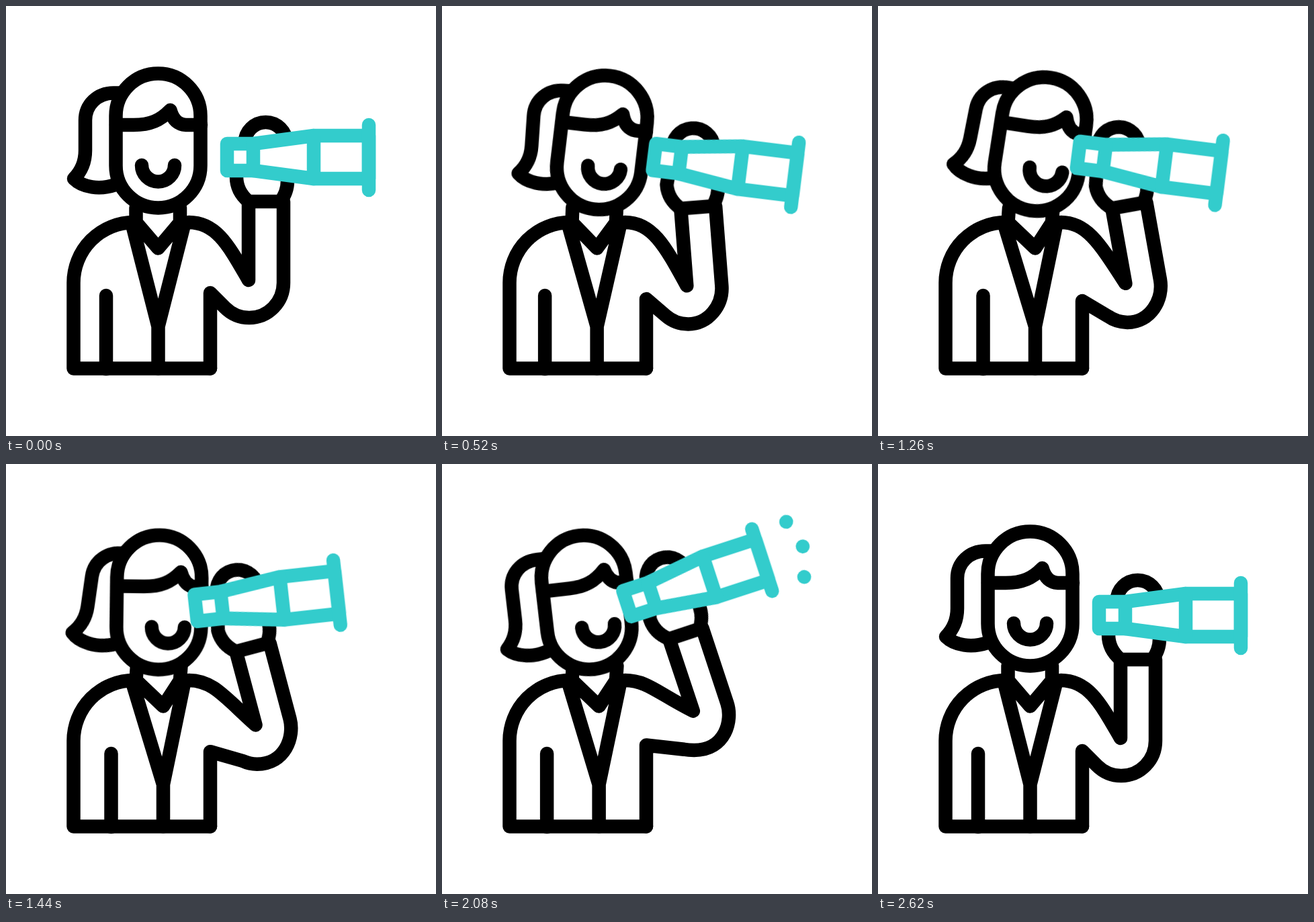
An HTML page without scripts for the animation above (3 s loop, 640 by 640 pixels).

```html
<!DOCTYPE html>
<html lang="en">
<head>
<meta charset="utf-8">
<title>Lookout</title>
<style>
  html, body { margin: 0; height: 100%; overflow: hidden; background: #fff; }
  svg { display: block; width: 100%; height: 100%; }
  path, rect { fill: none; stroke: #000; stroke-width: 20.5; stroke-linecap: round; stroke-linejoin: round; }
  .solid { fill: #fff; }
  .teal path { stroke: #3cc; }

  /* Three poses: --r at rest, --a looking down, --b looking up */
  .move, .morph, #pony, #rays { animation: 3s cubic-bezier(.333, 0, .667, 1) infinite; }
  .move { --r: translate(0px, 0px) rotate(0deg); animation-name: move; }
  .morph { animation-name: morph; }

  @keyframes move {
    0%, 6.667%, 86.667%, 100% { transform: var(--r); }
    26.667%, 36.667% { transform: var(--a); }
    56.667%, 66.667% { transform: var(--b); }
  }
  @keyframes morph {
    0%, 6.667%, 86.667%, 100% { d: var(--r); }
    26.667%, 36.667% { d: var(--a); }
    56.667%, 66.667% { d: var(--b); }
  }

  #head {
    transform-origin: 226.5px 200px;
    --a: translate(21.3px, 5px) rotate(12.2deg);
    --b: translate(-12px, 5.8px) rotate(-6.9deg);
  }
  #smile {
    --a: translate(14px, 0px) rotate(0deg);
    --b: var(--a);
  }
  #fringe {
    --r: path("M164 177L190 177C215 177 230 170 244.500 155C248 168 255 176 268 177L290 177");
    --a: path("M164 177L204 177C229 177 244 170 258.500 155C262 168 269 176 280 177L290 177");
    --b: var(--a);
  }
  #coat {
    --r: path("M193.500 300L193.500 322L226.500 360.500L259 322L259 300M187 322L226.500 477L266 322M226.500 477L226.500 539.500M149 431L149 540");
    --a: path("M195 300L193.500 322L234 360.500L259 322L260.500 300M187 322L234 477L266 322M234 477L234 539.500M156.500 431L156.500 540");
    --b: var(--a);
  }
  #arm {
    --r: path("M272 322C314 322 332 358 361 408L361 291M413 291L413 412C413 441 390 464 362 464C348 464 336 459 326 449L304 427L304 539.500");
    --a: path("M272 322C312 322 331 355 367 423L350.800 310.700M402.300 303.300L419 419.500C423 449 402 481 370 481C358 481 347 477 338 470L304 443.500L304 539.500");
    --b: path("M272 322C305 322 320 340 374.500 365.500L337 259.100M386.100 241.900L424.900 352.800C434 378 424 424 376 424C371 424 367 424 362 423.500L304 418L304 539.500");
  }
  #hand {
    transform-origin: 361px 408px;
    --a: translate(6.5px, 18.5px) rotate(-8.2deg);
    --b: translate(14.7px, -38.5px) rotate(-19.3deg);
  }
  #scope {
    transform-origin: 430px 225px;
    --a: translate(-25px, 22px) rotate(12.8deg);
    --b: translate(-61.5px, -51px) rotate(-19deg);
  }

  /* The ponytail trails behind the head, then settles */
  #pony { transform-origin: 165px 130px; animation-name: swing; }
  @keyframes swing {
    0%, 6.667%, 86.667%, 100% { transform: translate(0px, 0px) rotate(0deg); }
    26.667% { transform: translate(38px, -6px) rotate(7deg); }
    38% { transform: translate(40px, -10px) rotate(12deg); }
    56.667%, 58% { transform: translate(-5px, 16px) rotate(5deg); }
    66.667% { transform: translate(-20px, 13px) rotate(-6.9deg); }
  }

  /* Rays grow outward, shrink to their outer ends and vanish */
  #rays {
    --in: path("M573 195L573 195M583 225L583 225M574 255L574 255");
    --full: path("M573 195L592 182.500M583 225L604 225M574 255L592 269");
    --out: path("M592 182.500L592 182.500M604 225L604 225M592 269L592 269");
    animation-name: shoot;
  }
  @keyframes shoot {
    0%, 20%, 50% { d: var(--in); }
    30%, 60% { d: var(--full); }
    40%, 70%, 100% { d: var(--out); }
  }
  #flash { animation: flash 3s step-end infinite; }
  @keyframes flash {
    0%, 40%, 70%, 100% { opacity: 0; }
    20%, 50% { opacity: 1; }
  }
</style>
</head>
<body>
<svg viewBox="0 0 640 640">
  <path d="M304 539.500H100.500V412A90 90 0 0 1 190 322"/>
  <path id="coat" class="morph"/>

  <path id="pony" d="M190 129.500H160C136 129.500 118 147 118 170V215C118 233 112 246 101 257C114 270 139 274 163 266L178 257"/>
  <g id="head" class="move">
    <rect class="solid" x="163.500" y="100.500" width="126" height="200" rx="63"/>
    <path id="fringe" class="morph"/>
    <path id="smile" class="move" d="M202 237A24.500 24.500 0 0 0 251 237"/>
  </g>

  <path id="arm" class="morph"/>
  <path id="hand" class="move" d="M361 291C349 281 343 268 343 254L355.500 204A31 31 0 0 1 417.500 204L419 260C419 273 415 281 409 291Z"/>

  <g id="scope" class="move teal">
    <path class="solid" d="M329 205H368L458 193H540V257H458L368 245H329Z"/>
    <path d="M368 205V245M458 193V257M540 177V274"/>
    <g id="flash"><path id="rays"/></g>
  </g>
</svg>
</body>
</html>
```
